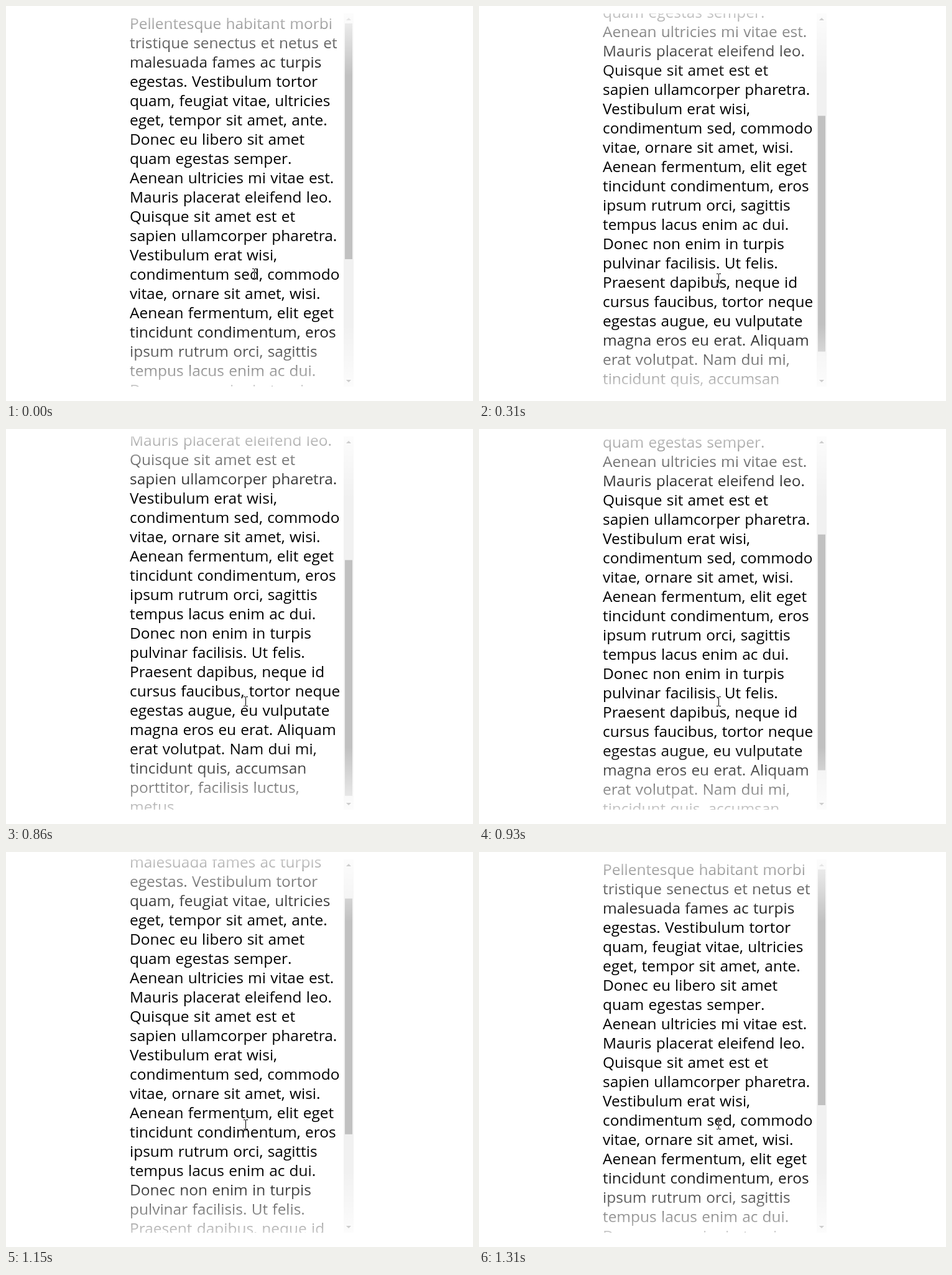
Write an HTML page that moves like this. It is 751 px wide and 635 px high and loops after 1390 ms.

```html
<!DOCTYPE html>
<html lang="la">
<head>
<meta charset="utf-8">
<title>Fading scroll area</title>
<style>
html, body { margin: 0; width: 100%; height: 100%; overflow: hidden; background: #fff; }
svg { display: block; }
text { font: 24.45px "Open Sans", "Noto Sans", sans-serif; word-spacing: .9px; fill: #000; }
#cursor { mix-blend-mode: difference; fill: none; stroke: #fff; }
</style>
</head>
<body>
<svg width="751" height="635" viewBox="0 0 751 635">
  <defs>
    <linearGradient id="fade" x2="0" y2="1">
      <stop stop-color="#fff" stop-opacity=".79"/>
      <stop offset="1" stop-color="#fff" stop-opacity="0"/>
    </linearGradient>
    <clipPath id="view"><rect x="190" y="12" width="369" height="600"/></clipPath>
  </defs>
  <rect width="751" height="635" fill="#fff"/>
  <g clip-path="url(#view)">
    <g id="lines"></g>
    <rect x="543" y="12" width="16" height="600" fill="#f1f1f1"/>
    <rect id="thumb" x="545" width="12" height="379" fill="#c1c1c1"/>
    <path id="up" d="M547 23l4-4 4 4z"/>
    <path id="down" d="M547 601l4 4 4-4z"/>
    <rect x="190" y="12" width="369" height="100" fill="url(#fade)"/>
    <rect x="190" y="12" width="369" height="100" fill="url(#fade)" transform="matrix(1 0 0 -1 0 624)"/>
  </g>
  <path id="cursor" d="M-3 -7.5h3M1 -7.5h3M.5 -7v14M-3 7.5h3M1 7.5h3"/>
</svg>
<script>
const copy = `Pellentesque habitant morbi
tristique senectus et netus et
malesuada fames ac turpis
egestas. Vestibulum tortor
quam, feugiat vitae, ultricies
eget, tempor sit amet, ante.
Donec eu libero sit amet
quam egestas semper.
Aenean ultricies mi vitae est.
Mauris placerat eleifend leo.
Quisque sit amet est et
sapien ullamcorper pharetra.
Vestibulum erat wisi,
condimentum sed, commodo
vitae, ornare sit amet, wisi.
Aenean fermentum, elit eget
tincidunt condimentum, eros
ipsum rutrum orci, sagittis
tempus lacus enim ac dui.
Donec non enim in turpis
pulvinar facilisis. Ut felis.
Praesent dapibus, neque id
cursus faucibus, tortor neque
egestas augue, eu vulputate
magna eros eu erat. Aliquam
erat volutpat. Nam dui mi,
tincidunt quis, accumsan
porttitor, facilisis luctus,
metus`;

const LOOP = 1390, LINE = 31, MAX = 299;
// [start time in ms, scroll offset]
const steps = [
  [0, 0], [80, 12], [160, 103], [230, 172], [310, 235], [380, 276], [460, MAX],
  [860, 289], [930, 224], [1010, 149], [1090, 105], [1150, 74], [1230, 25], [1310, 0]
];
const el = id => document.getElementById(id);

copy.split("\n").forEach((line, i) => {
  const text = document.createElementNS("http://www.w3.org/2000/svg", "text");
  text.setAttribute("x", 199);
  text.setAttribute("y", 37 + i * LINE);
  text.textContent = line;
  el("lines").append(text);
});

function draw(time) {
  const scroll = steps.findLast(([start]) => start <= time)[1];
  const arrowColor = atEnd => atEnd ? "#a3a3a3" : "#505050";
  el("lines").setAttribute("transform", `translate(0 ${-scroll})`);
  el("thumb").setAttribute("y", 28 + scroll * 189 / MAX);
  el("up").setAttribute("fill", arrowColor(scroll === 0));
  el("down").setAttribute("fill", arrowColor(scroll === MAX));
  el("cursor").setAttribute("transform", time < 80 ? "translate(399 430)" : "translate(385 438)");
}

function tick() {
  draw(performance.now() % LOOP);
  requestAnimationFrame(tick);
}
tick();
</script>
</body>
</html>
```
